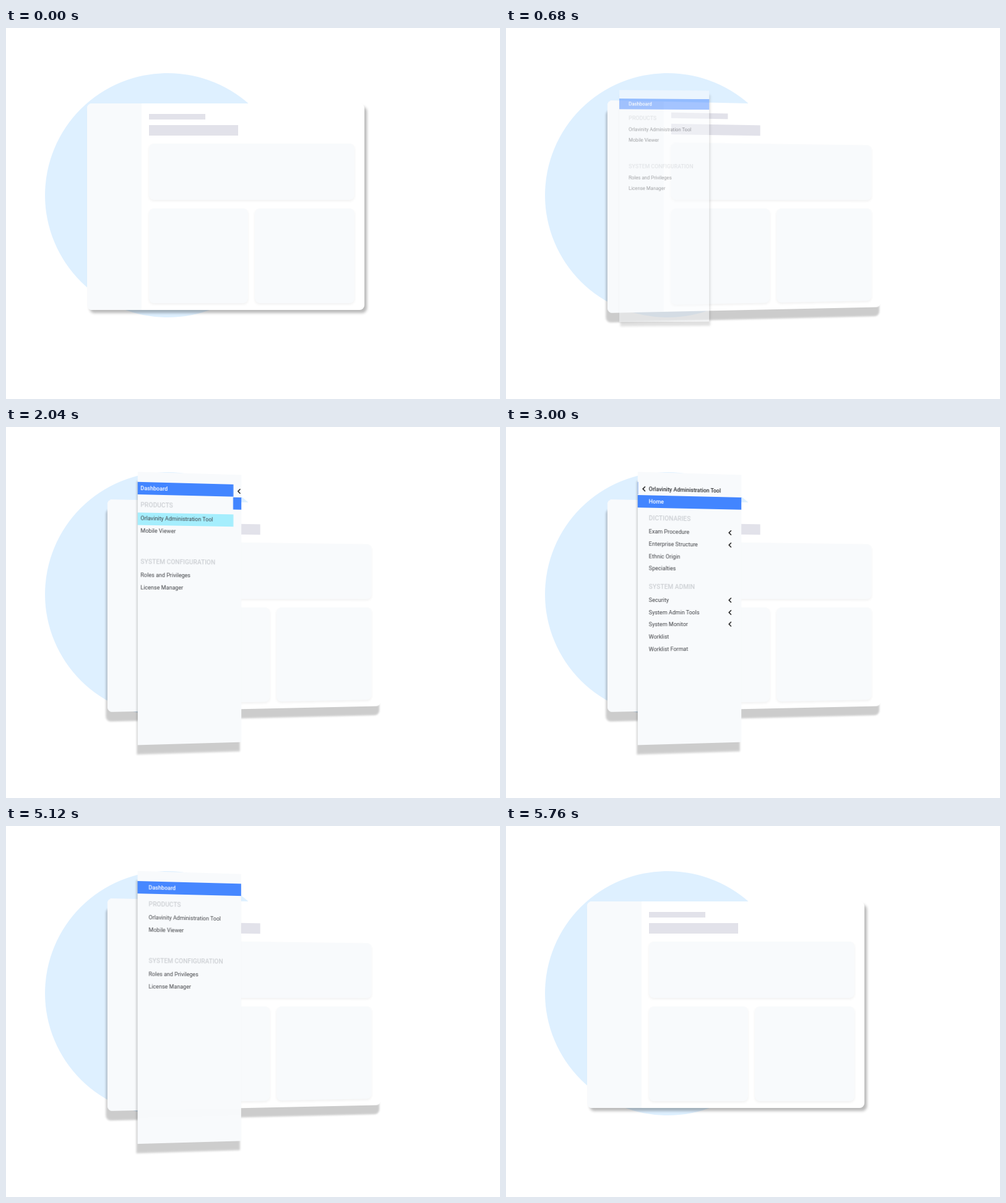
These frames come from a looping animation (798 px wide and 600 px high, 5920 ms). An HTML page:

```html
<!DOCTYPE html>
<html lang="en">
<head>
<meta charset="utf-8">
<title>Sidebar navigation</title>
<style>
  html, body { margin: 0; width: 100%; height: 100%; overflow: hidden; background: #fff; }
  #stage { position: relative; width: 798px; height: 600px; overflow: hidden; font-family: Roboto, Arial, sans-serif; }
  #stage div { position: absolute; }
  #circle { left: 62.5px; top: 73px; width: 396px; height: 395px; border-radius: 50%; background: #def0ff; }
  #card { left: 131px; top: 122px; width: 448px; height: 334px; border-radius: 8px; background: #fff; }
  .side { left: 0; top: 0; width: 88px; height: 334px; border-radius: 8px 0 0 8px; background: #f8fafc; }
  .bar { background: #e2e2ea; }
  .box { background: #f8fafc; border-radius: 8px; box-shadow: 0 2px 4px rgba(0, 0, 0, .06); }
  #panel { left: 0; top: 0; width: 169.5px; height: 437px; margin: -218.5px 0 0 -84.75px; background: #f8fafc; }
  #clip { left: 0; top: 0; width: 100%; height: 100%; overflow: hidden; }
  .menu { left: 0; top: 0; width: 100%; height: 100%; }
  .row { left: 0; width: 100%; height: 20px; }
  .blue { background: #4285ff; }
  .cyan { background: #a5eefd; }
  .text { left: 17.8px; height: 20px; line-height: 20px; white-space: pre; font-size: 9.05px; color: #404246; }
  .text.head { font-size: 10.3px; font-weight: 500; color: #cccfd3; }
  .text.on { font-weight: 500; color: #fff; }
  .text.back { font-size: 8.95px; font-weight: 500; color: #2b2d30; }
  svg { position: absolute; width: 6px; height: 10px; fill: none; stroke: #111; stroke-width: 1.5; }
</style>
</head>
<body>
<div id="stage">
  <div id="circle"></div>
  <div id="card"><div class="side"></div></div>
  <div id="panel"><div id="clip">
    <div class="menu" id="main"></div>
    <div class="menu" id="sub"></div>
  </div></div>
</div>
<script>
const LOOP = 5920, STEP = 40, PANEL_W = 169.5, ANGLE = 10;
const $ = id => document.getElementById(id);
const card = $('card'), panel = $('panel'), mainMenu = $('main'), subMenu = $('sub');

function add(parent, cls, style, text = '') {
  const el = document.createElement('div');
  el.className = cls;
  el.textContent = text;
  for (const key in style) el.style[key] = style[key] + 'px';
  return parent.appendChild(el);
}
const rect = (cls, left, top, width, height) => add(card, cls, { left, top, width, height });
const row = (menu, cls, y) => add(menu, 'row ' + cls, { top: y - 10 });
const label = (menu, y, text, cls = '') => add(menu, 'text ' + cls, { top: y - 10 }, text);
function chevron(menu, x, y) {
  menu.insertAdjacentHTML('beforeend',
    `<svg viewBox="0 0 6 10" style="left:${x - 3}px;top:${y - 5}px"><path d="M5 1.3 1.3 5 5 8.7"/></svg>`);
}

rect('bar', 100, 17, 90.5, 9);
rect('bar', 100, 35, 144, 17);
rect('box', 100, 65, 332, 91);
rect('box', 100, 170, 160, 153);
rect('box', 271, 170, 161, 153);

const tool = 'Orlavinity Administration Tool';

row(mainMenu, 'blue', 26);
const toolHover = row(mainMenu, 'cyan', 74.5);
label(mainMenu, 26, 'Dashboard', 'on');
label(mainMenu, 53.3, 'PRODUCTS', 'head');
label(mainMenu, 74.2, tool);
label(mainMenu, 93.9, 'Mobile Viewer');
label(mainMenu, 144.3, 'SYSTEM CONFIGURATION', 'head');
label(mainMenu, 165, 'Roles and Privileges');
label(mainMenu, 184.8, 'License Manager');

const backHover = row(subMenu, 'cyan', 27);
row(subMenu, 'blue', 47.2);
label(subMenu, 27.3, tool, 'back');
chevron(subMenu, 9.7, 27);
label(subMenu, 46.7, 'Home', 'on');
label(subMenu, 74.4, 'DICTIONARIES', 'head');
['Exam Procedure', 'Enterprise Structure', 'Ethnic Origin', 'Specialties'].forEach((text, i) => {
  const y = 95 + i * 19.75;
  label(subMenu, y, text);
  if (i < 2) chevron(subMenu, 151, y);
});
label(subMenu, 184.4, 'SYSTEM ADMIN', 'head');
['Security', 'System Admin Tools', 'System Monitor', 'Worklist', 'Worklist Format'].forEach((text, i) => {
  const y = 205 + i * 19.65;
  label(subMenu, y, text);
  if (i < 3) chevron(subMenu, 151, y);
});

// cubic-bezier(.25, .1, .25, 1)
function ease(x) {
  if (x <= 0) return 0;
  if (x >= 1) return 1;
  const curve = (a, b, u) => 3 * a * u * (1 - u) ** 2 + 3 * b * u * u * (1 - u) + u ** 3;
  let lo = 0, hi = 1;
  for (let i = 0; i < 24; i++) {
    const mid = (lo + hi) / 2;
    if (curve(.25, .25, mid) < x) lo = mid; else hi = mid;
  }
  return curve(.1, 1, lo);
}
const mix = (a, b, p) => a + (b - a) * p;
const tween = (t, start, length) => ease((t - start) / length);
const shadow = p =>
  `${mix(4, -2.5, p)}px ${mix(5, 15, p)}px ${mix(4, 3, p)}px rgba(0,0,0,${mix(.27, .2, p)})`;
const pose = (x, y, p, scale) =>
  `translate(${x}px,${y}px) perspective(1350px) rotateY(${ANGLE * p}deg) scale(${scale})`;

function draw(t) {
  const tilt = tween(t, 0, 600) - tween(t, 5340, 420);
  card.style.transform = pose(36 * tilt, 0, tilt, 1);
  card.style.boxShadow = shadow(tilt);

  const leaving = t > 3000;
  const p = leaving ? 1 - tween(t, 5115, 410) : tween(t, 600, 400);
  const alpha = leaving ? 1 - tween(t, 5105, 490) : tween(t, 600, 280);
  const from = leaving ? { x: 243.5, y: 286, s: .79 } : { x: 238.4, y: 285.2, s: .796 };
  panel.style.transform = pose(mix(from.x, 297.4, p), mix(from.y, 293, p), p, mix(from.s, 1, p));
  panel.style.boxShadow = shadow(p);
  panel.style.opacity = leaving ? Math.max(0, alpha - .12 * (1 - alpha)) : alpha;

  const slide = tween(t, 1992, 540) - tween(t, 4238, 540);
  mainMenu.style.transform = `translateX(${-PANEL_W * slide}px)`;
  subMenu.style.transform = `translateX(${PANEL_W * (1 - slide)}px)`;
  toolHover.style.opacity = t < 2500 ? tween(t, 1420, 260) : 0;
  backHover.style.opacity = tween(t, 3810, 200);
}

const origin = performance.now();
function tick() {
  const t = (performance.now() - origin) % LOOP;
  draw(Math.floor(t / STEP) * STEP);
  requestAnimationFrame(tick);
}
tick();
</script>
</body>
</html>
```
